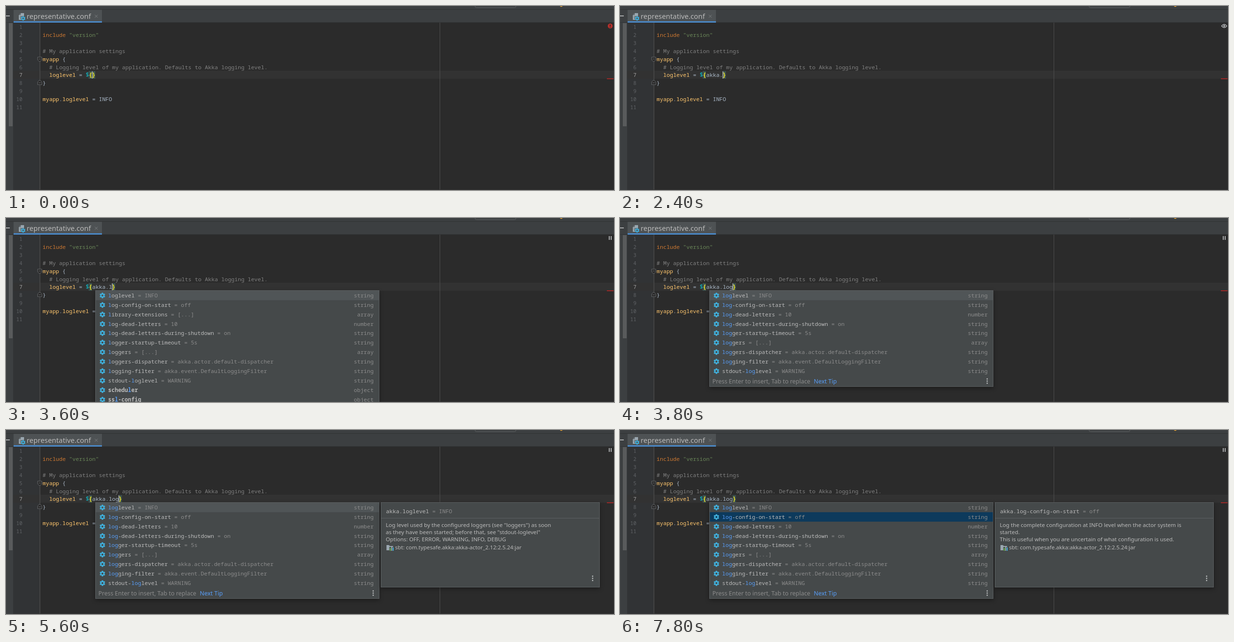
Animation, 1280 px wide and 387 px high, one loop 8 s. Source, as an HTML page:

```html
<!DOCTYPE html>
<html lang="en">
<head>
<meta charset="utf-8">
<title>Config completion</title>
<style>
html, body { margin: 0; width: 100%; height: 100%; overflow: hidden; background: #2b2b2b; }
svg { display: block; width: 100%; height: 100%; }
text { white-space: pre; font: 11.62px "Noto Sans Mono", "DejaVu Sans Mono", monospace; fill: #a9b7c6; }
.ui { font-family: "Noto Sans", "Open Sans", sans-serif; fill: #bbb; }
.tab { font-size: 14.85px; }
.foot { font-size: 12.45px; fill: #8c8c8c; }
.num { font-size: 10.8px; fill: #606366; text-anchor: end; }
.end { text-anchor: end; }
.key { fill: #ffc66d; }
.word { fill: #cc7832; }
.str { fill: #6a8759; }
.note { fill: #808080; }
.dim { fill: #8c8c8c; }
.name { fill: #bbb; }
.hit { fill: #589df6; }
.bold { font-weight: 700; }
.brace { fill: #ffef28; font-weight: 700; }
.dollar { fill: #16a9b4; font-weight: 700; }
.popup { filter: drop-shadow(0 3px 4px rgba(0, 0, 0, .35)); }

.step { animation: 8s step-end infinite; }
.caret { animation-name: blink; }
.typing { animation-name: type; }
.first { animation-name: first; }
.all { animation-name: all; }
.l { animation-name: l; }
.lo { animation-name: lo; }
.log { animation-name: log; }
.before { animation-name: before; }
.after { animation-name: after; }
.doc { animation-name: doc; }
.error { animation-name: error; }
.eye { animation-name: eye; }
.pause { animation-name: pause; }

@keyframes blink {
  0%, 10%, 25%, 45%, 67.5%, 80%, 92.5% { opacity: 1; }
  6.25%, 16.25%, 42.5%, 60%, 72.5%, 87.5%, 97.5%, 100% { opacity: 0; }
}
@keyframes type {
  0% { transform: translateX(0); }
  27.5% { transform: translateX(28px); }
  30% { transform: translateX(35px); }
  45% { transform: translateX(42px); }
  46.25% { transform: translateX(49px); }
  47.5%, 100% { transform: translateX(56px); }
}
@keyframes first { 0%, 27.5%, 100% { opacity: 0; } 11.25% { opacity: 1; } }
@keyframes all { 0%, 45%, 100% { opacity: 0; } 31.25% { opacity: 1; } }
@keyframes l { 0%, 46.25%, 100% { opacity: 0; } 45% { opacity: 1; } }
@keyframes lo { 0%, 47.5%, 100% { opacity: 0; } 46.25% { opacity: 1; } }
@keyframes log { 0% { opacity: 0; } 47.5%, 100% { opacity: 1; } }
@keyframes doc { 0% { opacity: 0; } 70%, 100% { opacity: 1; } }
@keyframes before { 0% { opacity: 1; } 97.5%, 100% { opacity: 0; } }
@keyframes after { 0% { opacity: 0; } 97.5%, 100% { opacity: 1; } }
@keyframes error { 0% { opacity: 1; } 27.5%, 100% { opacity: 0; } }
@keyframes eye { 0%, 33.75%, 100% { opacity: 0; } 27.5% { opacity: 1; } }
@keyframes pause { 0% { opacity: 0; } 33.75%, 100% { opacity: 1; } }
</style>
</head>
<body>
<svg id="stage" viewBox="0 0 1280 387"></svg>
<script>
const rect = (x, y, w, h, fill, more = '') =>
  `<rect x="${x}" y="${y}" width="${w}" height="${h}" fill="${fill}" ${more}/>`;
const text = (x, y, body, cls = '') => `<text x="${x}" y="${y}" class="${cls}">${body}</text>`;
const span = (cls, body) => `<tspan class="${cls}">${body}</tspan>`;
const step = (cls, body) => `<g class="step ${cls}">${body}</g>`;
const path = (d, stroke, more = '') => `<path d="${d}" fill="none" stroke="${stroke}" ${more}/>`;
const lineY = n => Math.round(48 + 16.9 * (n - 1));

function gear(x, y, size = 1) {
  let teeth = '';
  for (let a = 0; a < 360; a += 60) teeth += rect(-1.5, -5.9, 3, 3, '#40b0dc', `transform="rotate(${a})"`);
  return `<g transform="translate(${x} ${y}) scale(${size})">${teeth}` +
    '<circle r="3.3" fill="none" stroke="#40b0dc" stroke-width="2.4"/></g>';
}

const dots = (x, y) => [-4.5, 0, 4.5].map(d => rect(x - 1.2, y + d - 1.2, 2.4, 2.4, '#bfc1c2')).join('');

function frame() {
  const fold = (y, s) => `<g transform="translate(71 ${y}) scale(1 ${s})">` +
    '<path d="M-4.5-4.5h9v5.5l-3 3.5h-3l-3-3.5z" fill="#2b2b2b" stroke="#606366"/>' +
    path('M-2.5-.5h5', '#606366') + '</g>';
  let out = rect(0, 0, 1280, 387, '#2b2b2b') +
    rect(0, 0, 1280, 35, '#3c3f41') + rect(0, 7, 1280, 1, '#303233') + rect(0, 34, 1280, 1, '#323436') +
    rect(0, 35, 15, 352, '#3c3f41') + rect(15, 35, 56, 352, '#313335') +
    rect(6, 36, 8, 217, '#595b5c') + rect(0, 20, 8, 1.6, '#c4c6c7') +
    rect(987.5, -12, 86, 15.5, 'none', 'rx="3" stroke="#5e6162"') +
    '<circle cx="1169" cy="-1.5" r="3" fill="#f0a732"/>' +
    rect(16, 8, 186, 24, '#4e5254') + rect(16, 32, 186, 3, '#4a88c7') +
    '<path d="M31 15h7v8h-5v6h-6v-10z" fill="#9aa7b0"/>' +
    path('M27 18.5h3.5v-3.5', '#4e5254') + path('M29 22h5M29 25h3', '#4e5254') +
    '<circle cx="36" cy="26" r="5" fill="#4e5254"/>' + gear(36, 26, .8) +
    text(43.5, 27, 'representative.conf', 'ui tab') +
    path('M187 18.5l6 6m0-6l-6 6', '#7b7e80') +
    rect(15, 136, 1265, 17, '#323232') + rect(71, 35, 1, 352, '#555') + rect(913, 35, 1, 352, '#4f4f4f') +
    rect(15, 386, 1265, 1, '#343434') +
    fold(112, 1) + fold(161, -1) + rect(1265, 152, 14, 2, '#9e2927');
  for (let n = 1; n < 12; n++)
    out += text(34.5, lineY(n), n, 'num').replace('>', n == 7 ? ' style="fill:#a4a3a3">' : '>');
  return out;
}

function code() {
  const start = rect(174, 137, 7, 16, '#3b514d');
  const tail = rect(181, 137, 70, 15.5, '#323232') + rect(181, 137, 7, 16, '#3b514d') +
    text(181.3, 149, '}', 'brace') + step('caret', rect(181, 137.5, 1.2, 15, '#d0d0d0'));
  return text(77, lineY(2), span('word', 'include') + ' ' + span('str', '"version"')) +
    text(77, lineY(4), '# My application settings', 'note') +
    text(77, lineY(5), span('key', 'myapp') + ' {') +
    text(91, lineY(6), '# Logging level of my application. Defaults to Akka logging level.', 'note') +
    start + text(91, 149, span('key', 'loglevel') + ' = ' + span('dollar', '$') + span('brace', '{') + 'akka.log') +
    step('typing', tail) +
    text(77, lineY(8), '}') +
    text(77, lineY(10), span('key', 'myapp') + '.' + span('key', 'loglevel') + ' = INFO');
}

function status() {
  const error = '<circle cx="1272" cy="42" r="5.2" fill="#b3302c"/>' +
    rect(1271.2, 39, 1.6, 4, '#3a2424') + rect(1271.2, 44, 1.6, 1.6, '#3a2424');
  const eye = path('M1266.5 42q5.5-7 11 0q-5.5 7-11 0z', '#afb1b3', 'stroke-width="1.5"') +
    '<circle cx="1272" cy="42" r="2" fill="#afb1b3"/>';
  const pause = rect(1269, 38, 2, 8, '#afb1b3') + rect(1273, 38, 2, 8, '#afb1b3');
  return step('error', error) + step('eye', eye) + step('pause', pause);
}

const box = (x, w, h) => rect(x + .5, 152.5, w - 1, h - 1, '#45494a', 'class="popup" stroke="#5c6062"');
const bar = (x, w, n, fill) => rect(x + 1, 153 + n * 19.87, w - 2, 19.87, fill);

// Each item is "name|value|type"; objects are bold.
function rows(x, w, items, typed) {
  return items.map((item, i) => {
    const [name, value, type] = item.split('|'), y = Math.round(167 + i * 19.87);
    const label = typed ? name.replace(typed, span('hit', typed)) : name;
    return gear(x + 15, y - 4) +
      text(x + 27, y, span(type == 'object' ? 'name bold' : 'name', label) +
        (value && span('dim', ' = ' + value))) +
      text(x + w - 12, y, type, 'dim end');
  }).join('');
}

function footer(x, w, y, tip) {
  return text(x + 6.5, y, 'Press Enter to insert, Tab to replace', 'ui foot') +
    (tip ? text(x + 220, y, 'Next Tip', 'ui foot').replace('>', ' style="fill:#589df6">') : '') +
    dots(x + w - 13, y - 5);
}

const roots = ['akka||object', 'myapp||object', 'kek||object', 'ssl-config||object', 'refthing|5|number'];
const wide = ['loglevel|INFO|string', 'log-config-on-start|off|string', 'library-extensions|[...]|array',
  'log-dead-letters|10|number', 'log-dead-letters-during-shutdown|on|string',
  'logger-startup-timeout|5s|string', 'loggers|[...]|array',
  'loggers-dispatcher|akka.actor.default-dispatcher|string',
  'logging-filter|akka.event.DefaultLoggingFilter|string', 'stdout-loglevel|WARNING|string',
  'scheduler||object', 'ssl-config||object'];
const narrow = wide.filter(item => item.includes('log'));

function lists() {
  const X = 188, W = 598, grey = '#505557', blue = '#0d3a5c';
  const long = typed => box(X, W, 300) + bar(X, W, 0, grey) + rows(X, W, wide, typed);
  const short = (typed, mark) => box(X, W, 203) + mark + rows(X, W, narrow, typed) + footer(X, W, 348, true);
  const marks = step('before', bar(X, W, 0, grey)) + step('after', bar(X, W, 1, blue));
  return step('first', box(153, 323, 124) + bar(153, 323, 0, blue) + rows(153, 323, roots) + footer(153, 323, 269)) +
    step('all', long('')) + step('l', long('l')) +
    step('lo', short('lo', bar(X, W, 0, grey))) + step('log', short('log', marks));
}

function docs() {
  const page = (name, value, lines) =>
    text(800, 175, span('name', name) + span('dim', ' = ' + value)) +
    lines.map((s, i) => text(799.5, 204 + i * 15, s, 'ui')).join('');
  const library = '<path d="M801 242h5l2 2h7v9h-14z" fill="#9aa7b0"/>' + rect(807, 246, 10, 8, '#45494a') +
    rect(808, 248, 2, 6, '#62b543') + rect(811, 246, 2, 8, '#9aa7b0') + rect(814, 247, 2, 7, '#40b0dc');
  return step('doc', box(789, 461, 179) + rect(790, 185, 459, 1, '#5c6062') +
    step('before', page('akka.loglevel', 'INFO', [
      'Log level used by the configured loggers (see "loggers") as soon',
      'as they have been started; before that, see "stdout-loglevel"',
      'Options: OFF, ERROR, WARNING, INFO, DEBUG'])) +
    step('after', page('akka.log-config-on-start', 'off', [
      'Log the complete configuration at INFO level when the actor system is',
      'started.',
      'This is useful when you are uncertain of what configuration is used.'])) +
    library + text(819, 251, 'sbt: com.typesafe.akka:akka-actor_2.12:2.5.24:jar', 'ui') + dots(1235, 312));
}

document.getElementById('stage').innerHTML = frame() + code() + status() + lists() + docs();
</script>
</body>
</html>
```
